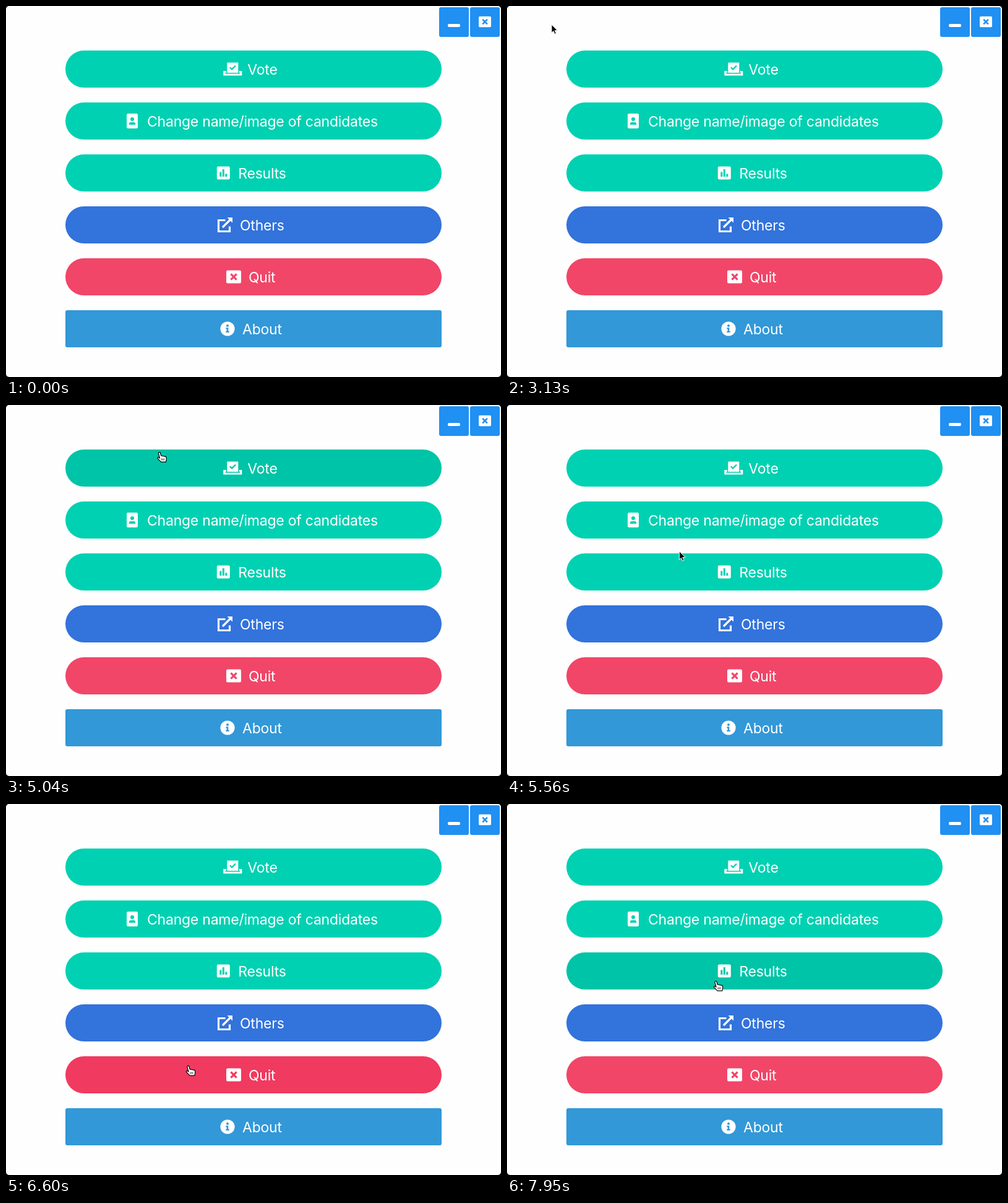
Write an HTML page that moves like this. It is 800x600 px and loops after 8 s.

```html
<!DOCTYPE html>
<html lang="en">
<head>
<meta charset="utf-8">
<title>Voting menu</title>
<style>
  html, body { margin: 0; width: 100%; height: 100%; overflow: hidden; background: #000; }
  svg { display: block; }
  text { font: 400 23px Inter, "Open Sans", sans-serif; letter-spacing: -.23px; }
  .button { fill: #fff; --paint: var(--color); }
  .hover { --paint: var(--over); }
  .face, .cut { fill: var(--paint); }
  .line, .cross { fill: none; stroke: #fff; stroke-width: 3.2; }
  .cross { stroke: var(--paint); }
  .thin { stroke-width: 2.2; }
</style>
</head>
<body>
<svg width="800" height="600">
  <rect width="800" height="600" rx="5" fill="#fefefe"/>
  <g id="menu"></g>
  <g class="button" style="--color:#2090f2">
    <rect class="face" x="700" y="2" width="48" height="48" rx="3"/>
    <rect class="face" x="750" y="2" width="48" height="48" rx="3"/>
    <rect x="714" y="29" width="20" height="5" rx="2"/>
    <g id="close" transform="translate(774 25.5) scale(.8333)"></g>
  </g>
  <g id="cursor">
    <path id="arrow" d="M0 0V13.5L3.1 10.6 5.2 15.4 7.5 14.4 5.4 9.7H9.6Z" stroke="#fff"/>
    <g id="hand" transform="translate(-4.4 -1)" stroke="#000">
      <path d="M3 .5Q5 0 5.5 2L6.5 6 14 7.3Q16 9 14.3 16.2H6.5L.9 10.3Q.5 8 2.5 8.8L4.4 10 2.4 2.6Q2 1 3 .5Z" fill="#fff" stroke-width="1.2" stroke-linejoin="round"/>
      <path d="M7.3 10.5v3m2-3v3m2-3v3" stroke-width=".8"/>
    </g>
  </g>
</svg>
<script>
const $ = id => document.getElementById(id);

// Icons are drawn around their own centre
const card = (w, h) => `<rect x="${-w / 2}" y="${-h / 2}" width="${w}" height="${h}" rx="2.2"/>`;
const path = (d, type = "") => `<path class="${type}" d="${d}"/>`;
const dot = (y, r) => `<circle class="cut" cy="${y}" r="${r}"/>`;
const bars = [7.5, 12, 4.5].map((h, i) => path(`M${4.5 * i - 6} 6v${-h}h3v${h}z`, "cut")).join("");
const icons = {
  vote: path("M-15 3h30v7.5h-30z") + path("M-12 6h24v1.5h-24zM-10.5 3h21v3h-21z", "cut") +
    path("M-9-10.5H9V6H-9z") + path("M-4.5-2.8l3.3 3.2 6-5.9", "cross thin"),
  portrait: card(18, 24) + dot(-3, 3) + path("M-5.2 6V5q0-3 3-3h4.4q3 0 3 3v1z", "cut"),
  chart: card(21, 21) + bars,
  link: path("M.5-7.5h-11v18h18v-8M-4 4L8-8", "line") + path("M3.5-12H12v8.5z"),
  close: card(24, 21) + path("M-4.6-4.6l9.2 9.2m0-9.2l-9.2 9.2", "cross"),
  info: `<circle r="11.6"/>` + dot(-5.1, 2) + path("M-2.7-1.8h4V4h1.4v2h-5.4V4h1.3V.2h-1.3z", "cut")
};

const green = ["#00d1b2", "#00c4a7"];
const blue = ["#3273dc", "#276cda"];
const red = ["#f14668", "#f03a5f"];
const sky = ["#3298d8", "#238cd1"];
const items = [
  ["Vote", "vote", 366.3, green],
  ["Change name/image of candidates", "portrait", 204, green],
  ["Results", "chart", 351.3, green],
  ["Others", "link", 354, blue],
  ["Quit", "close", 368, red],
  ["About", "info", 358, sky]
];
const top0 = 72, pitch = 84, height = 60;

$("close").innerHTML = icons.close;
$("menu").innerHTML = items.map(([label, icon, x, [color, over]], i) => `
  <g class="button" style="--color:${color};--over:${over}" transform="translate(0 ${top0 + i * pitch})">
    <rect class="face" x="96" width="608" height="${height}" rx="${label === "About" ? 3 : 30}"/>
    <g transform="translate(${x} 30)">${icons[icon]}</g>
    <text x="${x + 24}" y="39">${label}</text>
  </g>`).join("");
const buttons = [...$("menu").children];

// Pointer moves: start and end in ms, then where it comes to rest
const moves = [
  [3130, 3820, 283.5, 46.5],
  [3960, 4540, 224, 60],
  [4890, 5040, 248.5, 77],
  [5040, 6030, 304, 373],
  [6260, 6600, 295, 424],
  [6600, 7400, 338, 287]
];
const ease = k => k * k * (3 - 2 * k);

function pointAt(t) {
  let x = 72, y = 30;
  for (const [from, to, endX, endY] of moves) {
    const k = ease(Math.min(1, Math.max(0, (t - from) / (to - from))));
    x += (endX - x) * k;
    y += (endY - y) * k;
  }
  return [x, y];
}

function show(id, on) { $(id).setAttribute("display", on ? "inline" : "none"); }

function draw(t) {
  const [x, y] = pointAt(t), offset = y - top0;
  const over = offset >= 0 && offset % pitch < height ? Math.floor(offset / pitch) : -1;
  $("cursor").setAttribute("transform", `translate(${x} ${y})`);
  show("cursor", t >= moves[0][0]);
  show("hand", over >= 0);
  show("arrow", over < 0);
  buttons.forEach((button, i) => button.classList.toggle("hover", i === over));
}

const start = performance.now();
function tick() {
  draw((performance.now() - start) % 8000);
  requestAnimationFrame(tick);
}
tick();
</script>
</body>
</html>
```
